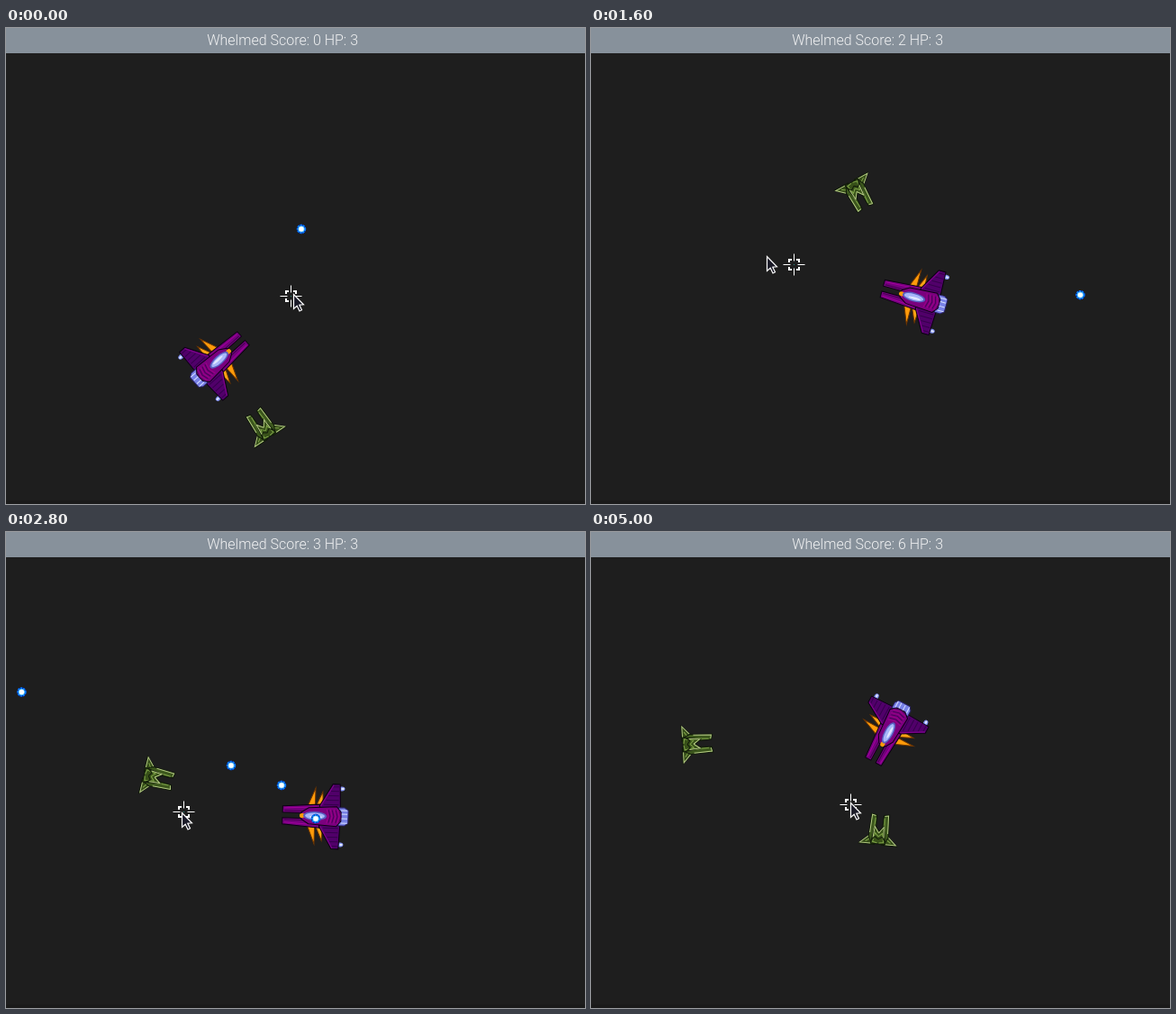
Write an HTML page with a canvas that moves like this. It is 643 by 528 pixels and loops after 5200 ms.

```html
<!DOCTYPE html>
<html lang="en">
<head>
<meta charset="utf-8">
<title>Space shooter</title>
<style>
html, body { margin: 0; width: 100%; height: 100%; overflow: hidden; background: #1e1e1e; }
canvas { position: absolute; left: 0; top: 0; }
#bar { position: absolute; left: 0; top: 0; width: 643px; height: 28px; background: #87919b; }
#bar span {
  position: absolute; right: 252px; top: 0; white-space: nowrap;
  font: 300 16px/28px Roboto, sans-serif; color: #f0f1f2;
}
</style>
</head>
<body>
<canvas id="stage" width="643" height="528"></canvas>
<div id="bar"><span id="title"></span></div>
<script>
const ctx = document.getElementById('stage').getContext('2d');
const title = document.getElementById('title');
const STEP = 200, LOOP = 5200, BULLET_SPEED = 96;
const stalls = [4, 6, 10, 16]; // steps at which the game clock does not advance

// Smooth paths through [clock, x, y]
const shipPath = [
  [0, 236, 369], [2, 192, 300], [4, 291, 200], [7, 394, 341], [9, 480, 284], [10, 458, 200],
  [11, 344, 315], [13, 277, 229], [15, 419, 190], [17, 421, 277], [19, 331, 222]
];
const aimPath = [
  [0, 316, 297], [2, 380, 300], [4, 519, 296], [5, 500, 318], [6, 225, 262], [7, 207, 252],
  [8, 270, 245], [9, 190, 270], [11, 197, 310], [12, 200, 308], [13, 279, 265],
  [17, 290, 303], [19, 288, 302]
];
// [first clock, last clock, x, y, vx, vy]
const enemies = [
  [0, 2, 284, 440, -22, -35], [4, 9, 283, 79, 7, 53], [4, 5, 562, 289, -36, 9],
  [7, 11, -3, 277, 43, -1], [12, 12, 20, 285, 0, 0], [12, 14, 307, 522, 0, -61],
  [18, 21, 320, 507, 0, -59], [19, 21, 20, 239, 49, -2]
];
// [first clock, x, y, heading in degrees, last clock if it hits]
const shots = [
  [0, 328, 223, -84], [3, 228, 335, 84], [4, 368, 218, 24], [7, 217, 248, 219],
  [7, 314, 316, 205], [8, 288, 276, 200], [11, 250, 259, 174], [11, 306, 281, 176, 11],
  [11, 344, 318, 191], [14, 296, 256, 114], [15, 357, 255, 134], [16, 357, 278, 155],
  [17, 366, 281, 166]
];

// Cubic Hermite curve with slopes taken from the neighbouring points
function along(path, t) {
  const last = path.length - 1;
  t = Math.min(Math.max(t, path[0][0]), path[last][0]);
  const i = Math.max(1, path.findIndex(p => p[0] >= t));
  const a = path[i - 1], b = path[i], dt = b[0] - a[0], s = (t - a[0]) / dt;
  const slope = (j, c) => j === 0 || j === last ? 0
    : (path[j + 1][c] - path[j - 1][c]) / (path[j + 1][0] - path[j - 1][0]);
  const value = c => a[c] + (b[c] - a[c]) * s * s * (3 - 2 * s)
    + dt * s * (1 - s) * ((1 - s) * slope(i - 1, c) - s * slope(i, c));
  return { x: value(1), y: value(2) };
}

function poly(fill, stroke, ...pts) {
  ctx.beginPath();
  for (let i = 0; i < pts.length; i += 2) ctx.lineTo(pts[i], pts[i + 1]);
  ctx.closePath();
  ctx.fillStyle = fill;
  ctx.fill();
  ctx.strokeStyle = stroke;
  ctx.stroke();
}

function line(color, ...pts) {
  ctx.beginPath();
  for (let i = 0; i < pts.length; i += 2) ctx.lineTo(pts[i], pts[i + 1]);
  ctx.strokeStyle = color;
  ctx.stroke();
}

function oval(color, x, y, rx, ry = rx) {
  ctx.fillStyle = color;
  ctx.beginPath();
  ctx.ellipse(x, y, rx, ry, 0, 0, 7);
  ctx.fill();
}

// Draws a nose-up sprite at p, turned towards goal.
function facing(p, goal, draw) {
  ctx.save();
  ctx.translate(p.x, p.y);
  ctx.rotate(Math.atan2(goal.y - p.y, goal.x - p.x) + Math.PI / 2);
  ctx.lineWidth = 1;
  draw();
  ctx.restore();
}

function mirrored(draw) {
  for (const s of [-1, 1]) {
    ctx.save();
    ctx.scale(s, 1);
    draw();
    ctx.restore();
  }
}

function drawShip() {
  const ink = '#0b0012';
  mirrored(() => {
    poly('#ff9b0a', '#6e3500', 9, -10, 31, -1, 10, -1);
    poly('#ffa514', '#6e3500', 9, -1, 27, 7, 10, 8);
    oval('#7d8cf0', 31, 28, 2.5, 3.5);
    oval('#dfe6ff', 31, 29, 1.2, 1.8);
    poly('#51006a', ink, 10, 3, 36, 18, 36, 26, 11, 27, 6, 22);
    for (let x = 13; x < 34; x += 5) line('#35004c', x, x / 2 + 2, x, 25);
    line('#85008f', 11, 5, 35, 19);
    poly('#74007d', ink, 3, -37, 10, -37, 13, 4, 3, 4);
    line('#a1009b', 8, -35, 10, 2);
    line('#41004e', 5, -35, 5, 2);
  });
  poly('#7881e6', '#282060', -10, 25, 10, 25, 10, 32, 7, 36, -7, 36, -10, 32);
  for (const x of [-7, -2, 3, 7]) line('#d8e0ff', x, 28, x, 35);
  poly('#7a007e', ink, -9, -8, -4, -16, 4, -16, 9, -8, 11, 23, 5, 28, -5, 28, -11, 23);
  for (let y = 12; y < 27; y += 4) {
    line('#9c0088', -8, y, 0, y + 2, 8, y);
    line('#480058', -7, y + 2, 0, y + 4, 7, y + 2);
  }
  oval('#ff9b0a', 0, -15, 2.5, 3);
  oval('#5860c0', 0, -1, 5, 13);
  oval('#a7b6fa', 0, -1, 3.5, 11);
  oval('#e0e8ff', -1, 0, 1.2, 7);
}

function drawEnemy() {
  const ink = '#10190a', pale = '#b3c982', leaf = '#7fa448';
  mirrored(() => {
    poly('#354d19', ink, 7, 3, 21, 17, 4, 17);
    line(pale, 9, 6, 20, 16, 8, 16);
    line(leaf, 8, 10, 14, 14);
    poly('#3c571d', ink, 4, -16, 10, -17, 11, 8, 8, 14, 3, 8);
    line(pale, 5, -15, 9, -16, 10, 4);
    line(leaf, 5, -13, 6, 2);
  });
  poly('#385119', ink, -5, -4, 0, 2, 5, -4, 8, 16, -8, 16);
  mirrored(() => {
    line(pale, 0, 4, 5, -3, 6, 9);
    line(leaf, 0, 8, 4, 4, 6, 14, 1, 15);
    line(ink, 0, 11, 4, 8, 7, 12);
  });
}

function drawBullet(x, y) {
  oval('#002c9c', x, y, 5.2);
  ctx.strokeStyle = '#0878ff';
  ctx.lineWidth = 2;
  ctx.setLineDash([2, 1]);
  ctx.beginPath();
  ctx.arc(x, y, 4.2, 0, 7);
  ctx.stroke();
  ctx.setLineDash([]);
  oval('#54c8ff', x, y, 3.6);
  oval('#fff', x, y, 2.7);
}

// Runs draw with the origin on the middle of a pixel.
function onPixel({ x, y }, draw) {
  ctx.save();
  ctx.translate(Math.round(x) + 0.5, Math.round(y) + 0.5);
  draw();
  ctx.restore();
}

function drawAim() {
  for (let i = 0; i < 4; i++) {
    ctx.lineWidth = 1;
    line('#fff', 4, 0, 12, 0);
    ctx.lineWidth = 2;
    line('#fff', 2.5, -5.5, 5.5, -5.5, 5.5, -2.5);
    ctx.rotate(Math.PI / 2);
  }
  ctx.fillStyle = '#2a8c80';
  ctx.fillRect(-0.5, -0.5, 1, 1);
}

function drawPointer() {
  ctx.lineWidth = 1.2;
  poly('#1b1b28', '#fff', 0, 0, 0, 16, 3.7, 12.7, 6.5, 18.5, 9, 17.3, 6.3, 11.7, 11, 11.3);
}

function render(now) {
  const step = Math.floor((now % LOOP) / STEP);
  const clock = step - stalls.filter(s => s <= step).length;
  const ship = along(shipPath, clock), aim = along(aimPath, clock);
  const pointer = along(aimPath, clock + 0.4); // the crosshair trails the pointer
  pointer.y -= 2;

  ctx.fillStyle = '#1e1e1e';
  ctx.fillRect(0, 0, 643, 528);
  ctx.fillStyle = '#1a1a1a';
  ctx.fillRect(0, 524, 643, 4);
  onPixel(aim, drawAim);
  for (const [first, last, x, y, vx, vy] of enemies) {
    const age = clock - first;
    if (age >= 0 && clock <= last) facing({ x: x + vx * age, y: y + vy * age }, ship, drawEnemy);
  }
  facing(ship, aim, drawShip);
  for (const [first, x, y, heading, last = Infinity] of shots) {
    const far = (clock - first) * BULLET_SPEED, angle = heading * Math.PI / 180;
    if (far >= 0 && clock <= last) drawBullet(x + far * Math.cos(angle), y + far * Math.sin(angle));
  }
  onPixel(pointer, drawPointer);
  const score = enemies.filter(e => e[1] < clock).length;
  title.textContent = `Whelmed Score: ${score} HP: 3`;
}

const start = performance.now();
function tick() {
  render(performance.now() - start);
  requestAnimationFrame(tick);
}
tick();
</script>
</body>
</html>
```
